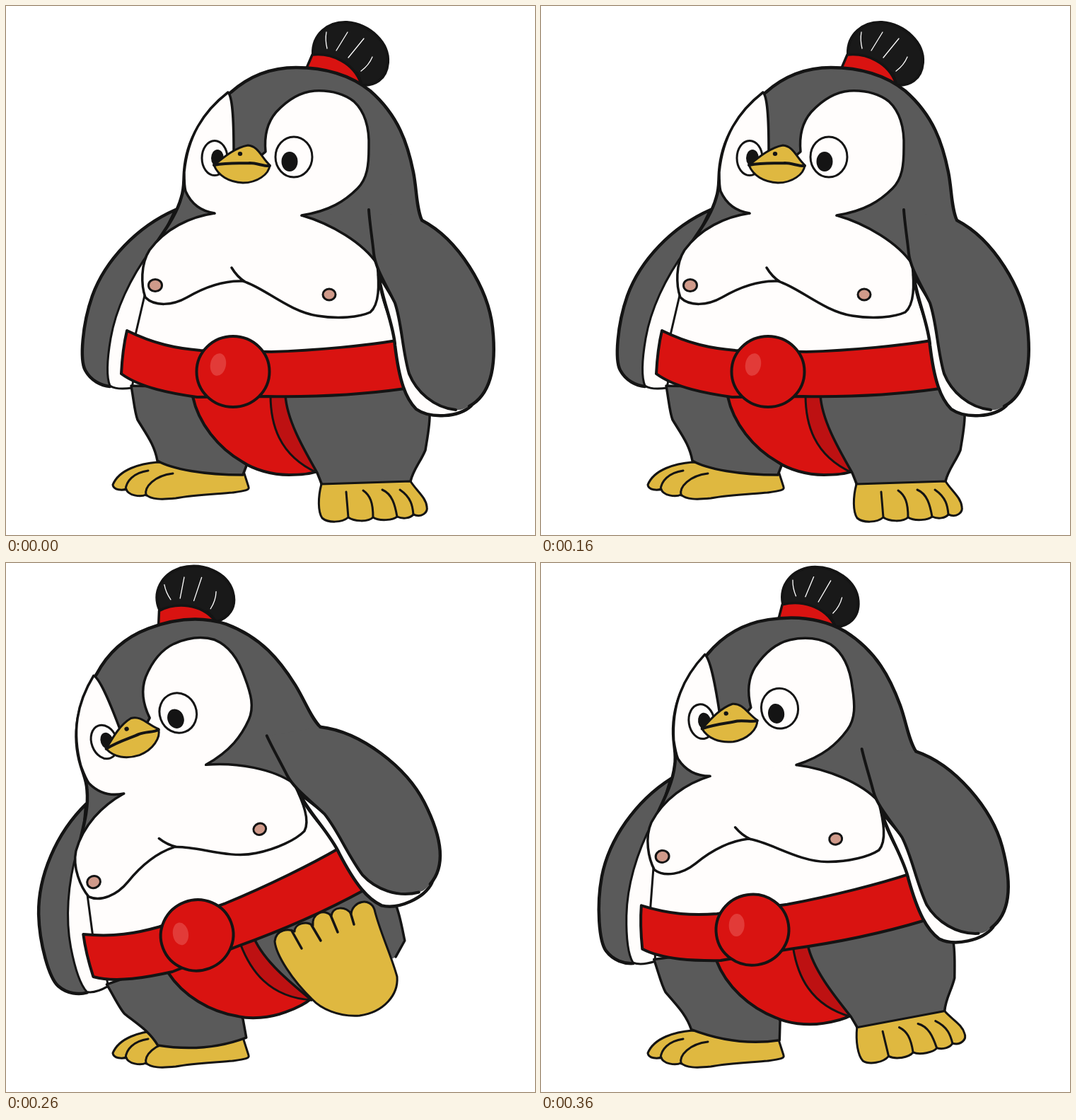
Write an HTML page with a canvas that moves like this. It is 748x748 px and loops after 0.38 s.

```html
<!DOCTYPE html>
<html lang="en">
<head>
<meta charset="utf-8">
<style>
html, body { margin: 0; width: 100%; height: 100%; overflow: hidden; background: #fff; }
canvas { display: block; width: 748px; height: 748px; }
</style>
</head>
<body>
<canvas id="stage" width="748" height="748"></canvas>
<script>
const ctx = document.getElementById('stage').getContext('2d');
const INK = '#141414', GREY = '#5a5a5a', WHITE = '#fffdfc', RED = '#d91311', DARK_RED = '#bd1112',
      GOLD = '#dfb840', PINK = '#d09a8a';
const LOOP = 380, STEP = 20, LIFT_RIGHT = 7.8, LIFT_LEFT = -20.7;

// [time in ms, body tilt in degrees]
const TILTS = [[0, 0], [60, 7.8], [80, 11], [100, 7.8], [160, 0], [200, -8.8],
               [260, -20.7], [280, -29], [300, -20.7], [360, -8.8], [380, 0]];

function tiltAt(t) {
  const i = TILTS.findIndex(key => key[0] > t);
  const [t0, a] = TILTS[i - 1], [t1, b] = TILTS[i];
  return a + (b - a) * (t - t0) / (t1 - t0);
}

function shape(d, fill, width = 3.5) {
  const path = new Path2D(d);
  if (fill) { ctx.fillStyle = fill; ctx.fill(path); }
  if (width) { ctx.lineWidth = width; ctx.strokeStyle = INK; ctx.stroke(path); }
}

function oval(x, y, rx, ry, fill, width = 0, angle = 0) {
  ctx.beginPath();
  ctx.ellipse(x, y, rx, ry, angle, 0, 7);
  ctx.fillStyle = fill;
  ctx.fill();
  if (width) { ctx.lineWidth = width; ctx.strokeStyle = INK; ctx.stroke(); }
}

function turn(degrees, x, y) {
  ctx.translate(x, y);
  ctx.rotate(degrees * Math.PI / 180);
  ctx.translate(-x, -y);
}

function layer(place, draw) {
  ctx.save();
  place();
  draw();
  ctx.restore();
}

function leftArm() {
  shape('M240 288C185 312 140 360 122 410C108 450 104 500 112 515C120 530 135 537 147 538L215 470V340Z', GREY, 4.5);
  shape('M205 345C175 385 155 430 148 470C142 505 142 525 147 537C155 542 165 542 178 540L200 420Z', WHITE, 3);
}

function leftFoot() {
  shape('M214 645C190 647 160 655 151 677C152 685 165 685 170 683C172 692 190 695 198 691C205 698 220 698 240 696C265 691 300 690 320 688C335 686 345 685 343 680L335 655Z', GOLD, 3);
  shape('M201 657C180 660 170 672 169 684M236 661C210 664 195 680 198 692', null, 3);
}

function raisedLeftFoot() {
  shape('M186 593C182 580 195 574 215 580C260 588 320 605 338 632C342 645 335 660 325 660C290 659 245 656 225 650C195 643 165 625 165 612C164 607 170 607 173 605C170 597 180 592 186 593Z', GOLD, 3);
  shape('M186 593C200 594 210 600 217 607M173 605C190 607 205 614 213 623', null, 3);
}

function rightFoot() {
  shape('M446 676C441 695 441 715 447 724C455 731 475 731 484 723C492 729 512 730 519 723C528 729 548 727 553 722C562 726 572 724 576 719C588 724 597 716 595 708C594 695 580 685 572 672Z', GOLD, 3);
  shape('M481 687L484 723M505 685C515 692 519 702 519 723M532 684C546 690 550 705 553 722M557 684C573 695 575 707 576 719', null, 3);
}

function sole() {
  shape('M433 617C405 590 382 555 380 535C382 517 400 517 408 521C408 510 425 505 434 513C432 495 450 488 460 499C462 485 480 485 488 496C490 478 515 472 521 490C528 520 545 555 553 585C555 610 535 635 500 640C470 642 445 630 433 617Z', GOLD, 3);
  shape('M404 520L418 545M432 512L445 534M459 498L469 522M487 494L492 511', null);
}

function legs(stretch, raised) {
  const thigh = 'C397 585 420 625 440 660';
  const hem = 663 + stretch;
  shape(`M177 537C181 560 182 575 186 585C198 605 210 620 214 643C235 655 280 ${hem} 335 ${hem}L340 650L300 540Z`, GREY);
  shape(`M264 552C272 590 300 625 335 645C350 655 375 663 400 663C420 663 432 661 440 658L395 550Z`, RED, 4);
  shape(`M374 550C374 590 385 635 440 660L395 550Z`, DARK_RED, 3);
  const calf = 'C600 590 595 615 593 628' + (raised ? 'L573 645' : 'C586 645 576 655 572 672');
  const ankle = raised ? '' : 'L570 680L448 690';
  shape(`M395 500V550${thigh}L448 674L572 672L600 575V500Z`, raised ? null : GREY, 0);
  shape(`M600 500V575${calf}${ankle}L440 660C420 625 397 585 395 550V500Z`, GREY, 0);
  shape(`M395 550${thigh}${raised ? '' : 'L448 680'}M599 575${calf}`, null);
}

function topknot() {
  shape('M434 68C433 40 455 22 482 23C515 26 542 52 540 80C538 105 520 113 503 112L497 95Z', '#191919', 4);
  shape('M433 69C460 66 492 80 502 110L490 116L424 90Z', RED);
  ctx.strokeStyle = '#fff';
  ctx.lineWidth = 1.3;
  ctx.stroke(new Path2D('M453 37Q451 48 454 60M483 37L467 63M506 46L484 73M518 72Q513 84 502 92'));
}

function torso() {
  shape('M203 350C218 325 240 300 248 270C252 258 251 250 252 235C255 190 278 150 318 122C345 98 375 87 410 87C450 87 485 96 515 120C555 155 568 195 576 235C581 260 580 285 588 303L540 380', GREY, 4.5);
  shape('M200 390L197 405L183 465L200 490H550C550 450 530 420 527 385Z', WHITE, 0);
  shape('M197 405L183 465M527 385C530 420 550 450 550 480', null, 3);
  shape('M295 293C260 298 225 315 203 345C190 365 191 395 197 412C210 425 235 424 256 412C285 395 310 388 335 389C365 398 400 432 440 438C470 443 500 440 515 433C528 422 528 395 525 365C505 335 460 308 418 296L400 285H310', WHITE, 0);
  shape('M295 293C260 298 225 315 203 345C190 365 191 395 197 412C210 425 235 424 256 412C285 395 310 388 335 389C365 398 400 432 440 438C470 443 500 440 515 433C528 422 528 395 525 365C505 335 460 308 418 296M319 370C325 380 330 385 338 390', null);
  oval(211, 395, 9.5, 8.5, PINK, 3);
  oval(457, 408, 9, 8, PINK, 3);
}

function face() {
  shape('M418 296C458 290 480 275 497 258C511 244 513 225 513 200C514 172 508 150 492 135C475 122 455 119 436 120C412 122 395 136 382 150C369 165 365 185 367 206L345 225L322 205C322 180 322 130 314 122C278 150 257 185 252 235C252 248 252 255 254 262C262 280 275 290 295 293', WHITE);
  oval(295, 215, 18, 24.5, WHITE, 3);
  oval(299, 215, 9, 12, INK);
  oval(407, 213.5, 26, 28.5, WHITE, 3);
  oval(401, 220, 11.5, 14, INK);
  shape('M294 225C310 212 325 200 342 197C357 198 361 214 373 225C372 238 355 250 335 250C315 249 300 240 294 225Z', GOLD, 3);
  shape('M294 225C315 221 330 223 345 222C355 222 365 227 373 226', null, 4);
  oval(331, 209, 3.2, 3, INK);
}

function belt() {
  shape('M171 459C210 478 240 484 275 487L375 489C440 487 510 480 552 473L564 541C500 550 430 553 370 552L270 553C235 548 190 540 163 520C164 500 166 480 171 459Z', RED, 4);
  oval(321, 517, 51.5, 50, RED, 4);
  oval(300, 507, 11, 16, '#e23b38', 0, 0.2);
}

function rightArm() {
  const inner = 'C605 568 580 545 570 520C560 485 560 450 550 420C538 395 522 370 520 350C518 330 514 305 513 288';
  const outer = 'M588 303C640 330 682 400 688 455C694 510 685 550 655 566';
  shape('M527 380C530 410 548 450 550 480C556 530 565 555 580 570C600 584 640 582 658 565L600 500Z', WHITE, 4.5);
  shape(outer + 'C648 570 642 572 636 571' + inner, GREY, 0);
  shape(outer, null, 4.5);
  shape('M636 571' + inner, null, 4);
}

function draw(t) {
  const tilt = tiltAt(t);
  const pivot = tilt > 0 ? [546, 644] : [321, 661];
  const lean = (rest = 0) => turn(tilt - rest, ...pivot);
  const leftUp = tilt > 4, rightUp = tilt < -15;
  const press = Math.min(1, Math.max(0, -tilt / 8.8));

  ctx.fillStyle = '#fff';
  ctx.fillRect(0, 0, 748, 748);
  layer(lean, leftArm);
  if (!leftUp) layer(() => {
    if (tilt > 0) lean();
    else ctx.translate(0, 16 * press);
  }, leftFoot);
  layer(lean, () => legs(14 * press, rightUp));
  if (leftUp) layer(() => lean(LIFT_RIGHT), raisedLeftFoot);
  if (!rightUp) layer(() => { if (tilt < 0) lean(); }, rightFoot);
  layer(lean, () => { topknot(); torso(); face(); belt(); rightArm(); });
  if (rightUp) layer(() => {
    const drop = t < 260 ? 1 : Math.min(1, (t - 260) / 40);
    const size = 1 - 0.065 * drop;
    lean(LIFT_LEFT);
    ctx.translate(467 + 21 * drop, 559 + 21 * drop);
    ctx.scale(size, size);
    ctx.translate(-467, -559);
  }, sole);
}

ctx.lineJoin = ctx.lineCap = 'round';
const start = performance.now();
function tick() {
  const t = (performance.now() - start) % LOOP;
  draw(Math.floor(t / STEP) * STEP);
  requestAnimationFrame(tick);
}
tick();
</script>
</body>
</html>
```
